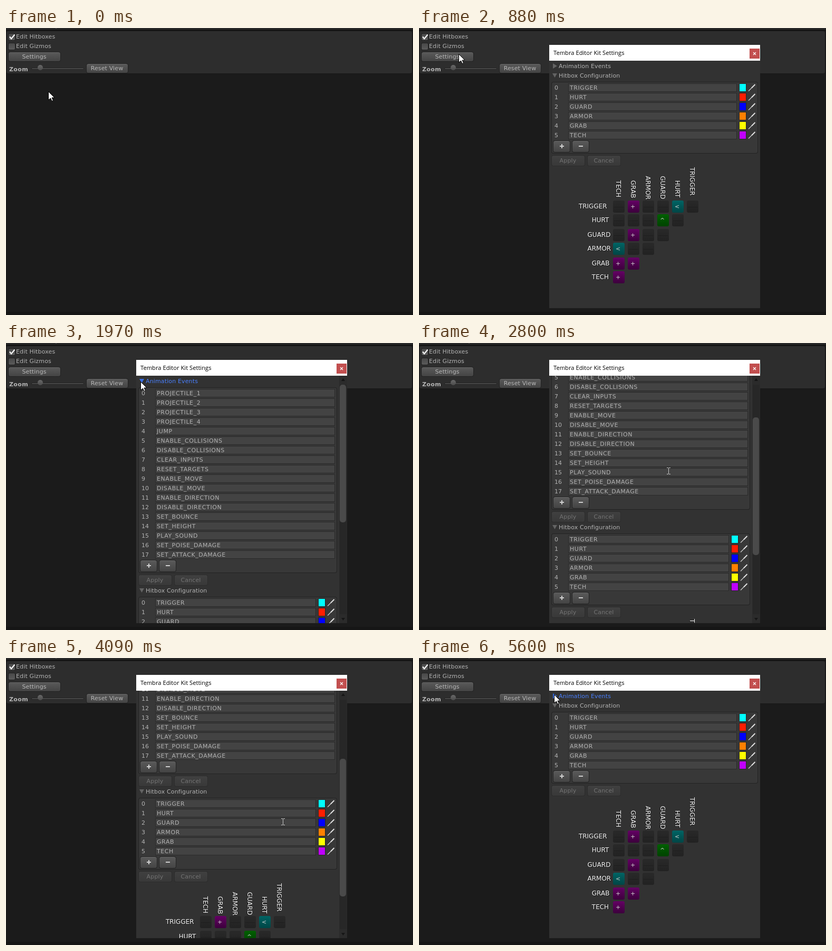
Animation of 772x544 px, one loop 5.7 s. Source, as an HTML page with a canvas:

```html
<!DOCTYPE html>
<html lang="en">
<head>
<meta charset="utf-8">
<title>Settings window</title>
<style>
html, body { margin: 0; width: 100%; height: 100%; overflow: hidden; background: #1b1b1b; }
canvas { display: block; }
</style>
</head>
<body>
<canvas id="stage" width="772" height="544"></canvas>
<script>
const ctx = document.getElementById('stage').getContext('2d');
const LOOP = 5700, MAX_SCROLL = 336;
const UI = '"DejaVu Sans", sans-serif';
const EVENTS = ['PROJECTILE_1', 'PROJECTILE_2', 'PROJECTILE_3', 'PROJECTILE_4', 'JUMP',
  'ENABLE_COLLISIONS', 'DISABLE_COLLISIONS', 'CLEAR_INPUTS', 'RESET_TARGETS', 'ENABLE_MOVE',
  'DISABLE_MOVE', 'ENABLE_DIRECTION', 'DISABLE_DIRECTION', 'SET_BOUNCE', 'SET_HEIGHT',
  'PLAY_SOUND', 'SET_POISE_DAMAGE', 'SET_ATTACK_DAMAGE'];
const BOXES = ['TRIGGER', 'HURT', 'GUARD', 'ARMOR', 'GRAB', 'TECH'];
const COLORS = ['#00ffff', '#ff1e00', '#0000ff', '#ff8000', '#ffff00', '#c000ff'];
const MATRIX = ['.+..<.', '...^.', '.+..', '<..', '++', '+'];
const CELL = {
  '.': ['#292929', '#222222'], '+': ['#640064', '#3c003c'],
  '<': ['#006464', '#004646'], '^': ['#006000', '#004200']
};

// Pointer moves: start, end, steps, x, y
const START = [80, 120];
const MOVES = [
  [60, 520, 9, 75, 49], [1030, 1570, 12, 254, 72], [1680, 1680, 1, 255, 73],
  [2060, 2490, 10, 473, 242], [3450, 3790, 7, 525, 310],
  [4760, 5290, 11, 262, 79], [5430, 5540, 3, 256, 69]
];
// Wheel ticks: time, scroll offset
const TICKS = [
  [2680, 60], [2770, 120], [2850, 180], [3000, 240], [3090, 300], [3190, MAX_SCROLL],
  [4000, 276], [4090, 216], [4140, 156], [4190, 96], [4240, 36], [4390, 0]
];

function rect(x, y, w, h, color) {
  ctx.fillStyle = color;
  ctx.fillRect(x, y, w, h);
}

function shade(y, h, top, bottom) {
  const g = ctx.createLinearGradient(0, y, 0, y + h);
  g.addColorStop(0, top);
  g.addColorStop(1, bottom);
  return g;
}

function round(x, y, w, h, r, fill) {
  ctx.beginPath();
  ctx.roundRect(x, y, w, h, r);
  ctx.fillStyle = fill;
  ctx.fill();
}

// Rounded box with a one pixel rim outside it
function rimmed(x, y, w, h, r, fill, rim) {
  round(x - 1, y - 1, w + 2, h + 2, r + 1, rim);
  round(x, y, w, h, r, fill);
}

function poly(points, fill, border) {
  ctx.beginPath();
  points.forEach(([x, y]) => ctx.lineTo(x, y));
  ctx.closePath();
  ctx.fillStyle = fill;
  ctx.fill();
  if (border) {
    ctx.strokeStyle = border;
    ctx.lineWidth = 1;
    ctx.stroke();
  }
}

function line(points, color, width) {
  ctx.beginPath();
  points.forEach(([x, y]) => ctx.lineTo(x, y));
  ctx.strokeStyle = color;
  ctx.lineWidth = width;
  ctx.stroke();
}

function text(str, x, y, color = '#b4b4b4', { font = '11px ' + UI, space = .14, align = 'left' } = {}) {
  ctx.font = font;
  ctx.letterSpacing = space + 'px';
  ctx.textAlign = align;
  ctx.fillStyle = color;
  ctx.fillText(str, x, y);
}

function button(x, y, w, h, label, { off = false, down = false } = {}) {
  const fill = off ? shade(y, h, '#404040', '#393939')
    : down ? shade(y, h, '#3c4858', '#46566c') : shade(y, h, '#5a5a5a', '#444444');
  rimmed(x, y, w, h, 3, fill, off ? '#2c2c2c' : '#222222');
  if (!off) rect(x + 3, y, w - 6, 1, '#666666');
  text(label, x + w / 2 - .5, y + Math.round(h / 2) + 3, off ? '#747474' : '#b8b8b8', { align: 'center' });
}

function signButton(x, y, plus) {
  button(x, y, 31, 21, '');
  rect(x + 12, y + 9, 8, 2, '#d0d0d0');
  if (plus) rect(x + 15, y + 6, 2, 8, '#d0d0d0');
}

function checkbox(y, on) {
  rimmed(5, y, 12, 12, 2, shade(y, 12, '#484848', '#5a5a5a'), '#222222');
  if (on) line([[7, y + 5.5], [10, y + 9.5], [16.5, y + 1.5]], '#f4f4f4', 2.2);
}

function toolbar(down) {
  rect(0, 0, 772, 544, '#1b1b1b');
  rect(0, 0, 772, 3, '#292929');
  rect(0, 3, 772, 2, '#141414');
  rect(94, 0, 2, 1, '#555555');
  rect(0, 538, 772, 6, '#161616');
  rimmed(1, 6, 769, 80, 3, '#2d2d2d', '#181818');
  checkbox(11, true);
  checkbox(29, false);
  text('Edit Hitboxes', 19, 20);
  text('Edit Gizmos', 19, 38);
  button(5, 46, 98, 17, 'Settings', { down });
  text('Zoom', 6, 82, '#b4b4b4', { font: 'bold 11px ' + UI, space: .35 });
  rimmed(49, 76, 98, 2, 1, '#484848', '#242424');
  ctx.beginPath();
  ctx.arc(65, 75, 5, 0, 7);
  ctx.fillStyle = shade(70, 10, '#686868', '#4c4c4c');
  ctx.fill();
  button(153, 68, 78, 17, 'Reset View');
}

function foldout(y, label, open, active) {
  const tri = open ? [[253, y - 4], [262, y - 4], [257.5, y + 4]]
    : [[254, y - 5], [262, y], [254, y + 5]];
  poly(tri, active ? '#3a6ee0' : '#636363');
  text(label, 265, y + 4, active ? '#4a80ff' : '#b4b4b4');
}

function dropper(x, y) {
  line([[x, y + 6.5], [x + 7, y - .5]], '#d0d0d0', 1.3);
  line([[x + 6, y + .5], [x + 12.5, y - 6]], '#e4e4e4', 1.9);
}

function list(top, right, items, colors) {
  const n = items.length, end = top + 18 * n;
  rimmed(252, top + 1, right - 253, 18 * n + 26, 3, '#383838', '#232323');
  items.forEach((name, i) => {
    const y = top + 11 + 18 * i, edge = right - (colors ? 40 : 4);
    rect(283, y - 8, edge - 283, 16, '#2a2a2a');
    rect(284, y - 7, edge - 285, 14, '#434343');
    text(i, 257, y + 4, '#b4b4b4', { space: .1 });
    text(name, 286, y + 4, '#b4b4b4', { space: .58 });
    if (colors) {
      rect(right - 36, y - 8, 14, 16, '#262626');
      rect(right - 35, y - 7, 12, 14, colors[i]);
      dropper(right - 18, y);
    }
  });
  signButton(255, end + 4, true);
  signButton(291, end + 4, false);
  button(252, end + 32, 62, 19, 'Apply', { off: true });
  button(320, end + 32, 62, 19, 'Cancel', { off: true });
}

function label(str, x, y) {
  const style = { font: '12px ' + UI, space: 0 };
  text(str, x + 1, y + 1, '#161616', style);
  text(str, x, y, '#f4f4f4', style);
}

function matrix(base) {
  [...BOXES].reverse().forEach((name, i) => {
    ctx.save();
    ctx.translate(374 + 28 * i, base - 16 - 8.3 * name.length);
    ctx.rotate(Math.PI / 2);
    label(name, 0, 0);
    ctx.restore();
  });
  MATRIX.forEach((row, i) => {
    const y = 2 * Math.floor((base + 27 * i) / 2);
    label(BOXES[i], 361 - 8.3 * BOXES[i].length, y + 4);
    [...row].forEach((mark, j) => {
      const x = 368 + 28 * j, [top, bottom] = CELL[mark];
      round(x, y - 11, 22, 23, 3, shade(y - 11, 23, top, bottom));
      if (mark === '.') {
        rect(x + 2, y + 1, 18, 1, '#1e1e1e');
      } else {
        text(mark, x + 9.5, y + 4, '#d0d0d0', { align: 'center', space: 0 });
      }
    });
  });
}

function scrollbar(scroll) {
  rect(632, 62, 15, 469, '#2b2b2b');
  rect(633, 79, 13, 435, '#272727');
  poly([[636, 72], [643, 72], [639.5, 67]], '#161616');
  poly([[636, 521], [643, 521], [639.5, 526]], '#161616');
  const y = Math.round(79 + scroll * 174 / MAX_SCROLL);
  round(633, y, 12, 261, 5, '#4a4a4a');
}

function settingsWindow(open, scroll, active) {
  const right = open ? 628 : 643, top = 72 - scroll;
  const config = top + (open ? 397 : 18);
  rect(247, 32, 400, 499, '#323232');
  ctx.save();
  ctx.beginPath();
  ctx.rect(247, 62, 400, 469);
  ctx.clip();
  foldout(top, 'Animation Events', open, active);
  if (open) list(top + 12, right, EVENTS);
  foldout(config, 'Hitbox Configuration', true, false);
  list(config + 12, right, BOXES, COLORS);
  matrix(config + 248);
  if (open) scrollbar(scroll);
  ctx.restore();
  rect(247, 32, 400, 30, '#ffffff');
  text('Tembra Editor Kit Settings', 255, 51, '#000000', { font: '11.2px "Open Sans", sans-serif', space: 0 });
  rect(627, 39, 19, 19, '#c24f4f');
  line([[634, 46], [639, 51]], '#ffffff', 1.3);
  line([[639, 46], [634, 51]], '#ffffff', 1.3);
}

function pointerAt(t) {
  let [x, y] = START;
  for (const [t0, t1, steps, tx, ty] of MOVES) {
    if (t < t0) break;
    const gap = (t1 - t0) / (steps - 1 || 1);
    const p = gap ? Math.min(1, (Math.floor((t - t0) / gap + .001) + 1) / steps) : 1;
    const e = p * p * (3 - 2 * p);
    x += (tx - x) * e;
    y += (ty - y) * e;
  }
  return [Math.round(x), Math.round(y)];
}

function overField(x, y, scroll) {
  const row = y + scroll;
  const inEvents = row > 86 && row < 410 && x < 624;
  const inBoxes = row > 483 && row < 591 && x < 588;
  return x > 283 && (inEvents || inBoxes);
}

function arrow(x, y) {
  const shape = [[0, 0], [0, 16], [4, 12.5], [6.5, 18], [9, 17], [6.5, 11.5], [11.5, 11.5]];
  poly(shape.map(([a, b]) => [x + a + .5, y + b + .5]), '#ffffff', '#000000');
}

function beam(x, y) {
  const c = '#c8c8c8';
  rect(x, y - 5, 1, 11, c);
  for (const dy of [-6, 6]) {
    rect(x - 3, y + dy, 3, 1, c);
    rect(x + 1, y + dy, 3, 1, c);
  }
}

function draw(t) {
  const open = t >= 1970 && t < 5600;
  let scroll = 0;
  for (const [at, value] of TICKS) if (t >= at) scroll = value;
  const [x, y] = pointerAt(t);
  toolbar(t >= 770 && t < 830);
  if (t >= 830) settingsWindow(open, scroll, t >= 1840);
  (open && overField(x, y, scroll) ? beam : arrow)(x, y);
}

let start;
function tick() {
  const now = performance.now();
  start ??= now;
  draw((now - start) % LOOP);
  requestAnimationFrame(tick);
}
tick();
</script>
</body>
</html>
```
